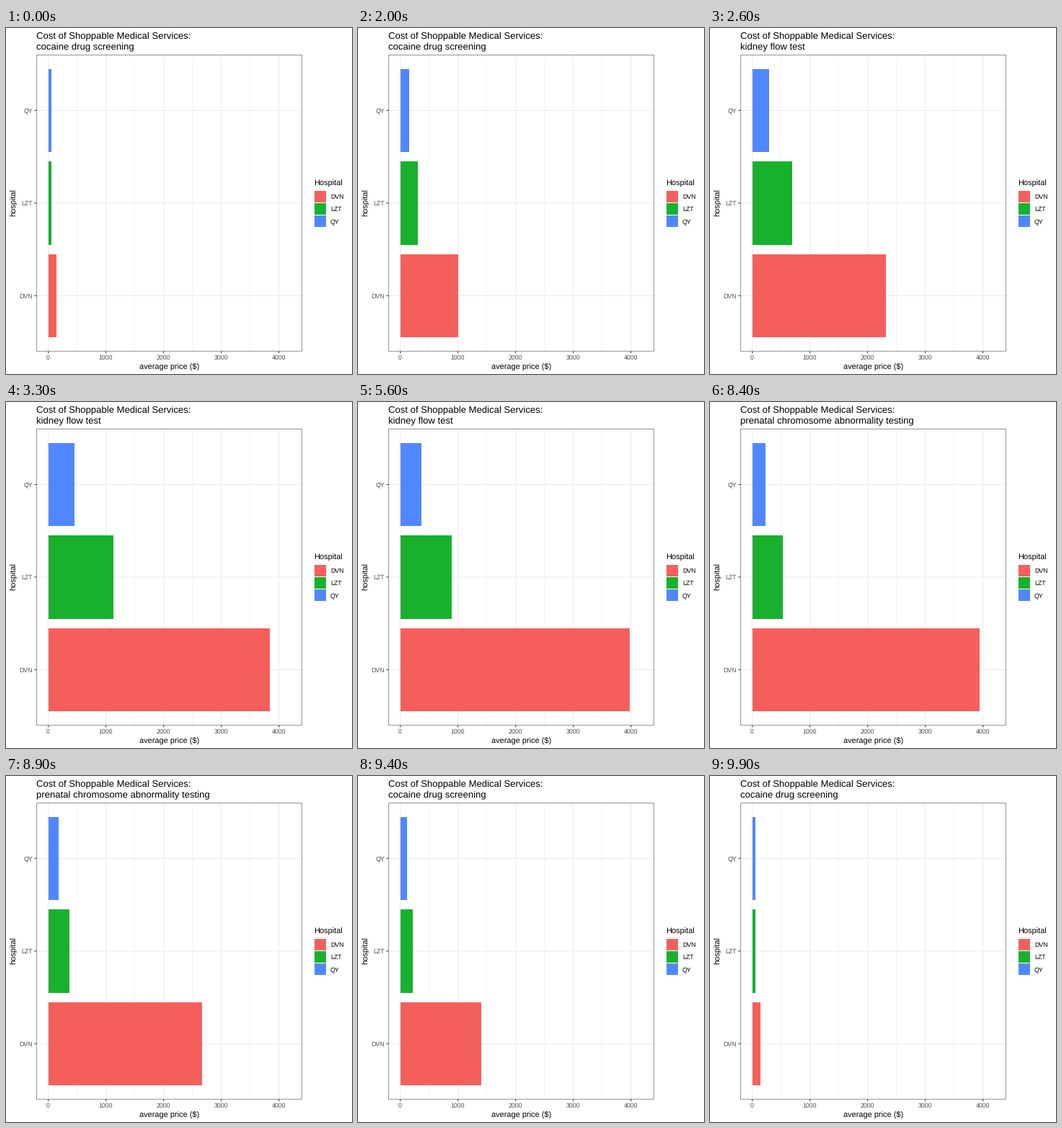
A matplotlib script for the animation above (10 s loop, 480 by 480 pixels).

```python
import matplotlib.pyplot as plt
from matplotlib.animation import FuncAnimation
from matplotlib.patches import Rectangle

plt.rcParams["font.family"] = "Liberation Sans"
plt.rcParams["text.hinting"] = "none"

SIZE, DPI = 480, 72
FRAMES, INTERVAL = 100, 100

LEFT, RIGHT, TOP, BOTTOM = 42.1, 410.9, 37.3, 448.45
ZERO, UNIT = 58.7, 0.08
ROW = (BOTTOM - TOP) / 3.2

THIN, THICK = 0.53, 1.07
SMALL, MEDIUM, LARGE = 8.77, 10.96, 13.15
GRID, DARK, LABEL = "#EBEBEB", "#333333", "#4D4D4D"
NAMES = ["DVN", "LZT", "QY"]
COLORS = ["#F55F5B", "#18B12D", "#5087FF"]

SERVICES = [
    ("cocaine drug screening", (138, 55, 55)),
    ("kidney flow test", (3838, 1130, 455)),
    ("prenatal chromosome abnormality testing", (4190, 555, 243)),
]
# last resting frame and number of steps of each transition
MOVES = [(16, 17), (49, 17), (83, 16)]

fig = plt.figure(figsize=(SIZE / DPI, SIZE / DPI), dpi=DPI, facecolor="white")
ax = fig.add_axes([0, 0, 1, 1])
ax.set_xlim(0, SIZE)
ax.set_ylim(SIZE, 0)
ax.axis("off")


def line(x0, y0, x1, y1, color, width=THICK, z=1):
    ax.plot([x0, x1], [y0, y1], color=color, lw=width, zorder=z,
            solid_capstyle="butt", snap=False)


def box(x, y, w, h, color):
    return ax.add_patch(Rectangle((x, y), w, h, fc=color, lw=0,
                                  zorder=3, snap=True))


def label(x, y, text, size, color="black", ha="left", **kw):
    return ax.text(x, y, text, fontsize=size, color=color, ha=ha,
                   va="baseline", zorder=5, **kw)


def price_x(price):
    return ZERO + UNIT * price


def row_y(i):
    return BOTTOM - ROW * (i + 0.6)


for price in range(500, 4000, 1000):
    line(price_x(price), TOP, price_x(price), BOTTOM, GRID, THIN)
for price in range(0, 4001, 1000):
    x = price_x(price)
    line(x, TOP, x, BOTTOM, GRID)
    line(x, BOTTOM, x, BOTTOM + 2.75, DARK, z=4)
    label(x - 0.3, 460, str(price), SMALL, LABEL, "center")

bars = []
for i, (name, color) in enumerate(zip(NAMES, COLORS)):
    y = row_y(i)
    line(LEFT, y, RIGHT, y, GRID)
    line(LEFT - 2.75, y, LEFT, y, DARK, z=4)
    label(37, y + 3.2, name, SMALL, LABEL, "right")
    bars.append(box(ZERO, y - 0.45 * ROW, 0, 0.9 * ROW, color))

    key_y = 233.6 + 17.28 * i
    box(428.1, key_y - 7.93, 15.86, 15.86, color)
    label(450, key_y + 3.2, name, SMALL)

# only the inner half of the panel border is visible
half = THIN / 2
ax.add_patch(Rectangle((LEFT + half, TOP + half), RIGHT - LEFT - THIN,
                       BOTTOM - TOP - THIN, fill=False, ec=DARK, lw=THIN,
                       zorder=4, snap=False))

label(42, 15, "Cost of Shoppable Medical Services:", LARGE)
service = label(42, 30, "", LARGE)
label(226.5, 472.7, "average price ($)", MEDIUM, ha="center")
label(427, 219, "Hospital", MEDIUM)
label(14, 242.5, "hospital", MEDIUM, ha="center", rotation=90,
      rotation_mode="anchor")


def state_at(frame):
    """Current service, next service and linear progress between them."""
    for i, (start, steps) in enumerate(MOVES):
        if frame <= start + steps:
            return i, (i + 1) % 3, max(0, frame - start) / steps
    return 0, 0, 0


def update(frame):
    now, after, t = state_at(frame)
    service.set_text(SERVICES[after if t > 0.5 else now][0])
    for bar, a, b in zip(bars, SERVICES[now][1], SERVICES[after][1]):
        bar.set_width(UNIT * (a + (b - a) * t))
    return [service, *bars]


anim = FuncAnimation(fig, update, frames=FRAMES, interval=INTERVAL,
                     repeat=True, repeat_delay=0, blit=False)
plt.show()
```
